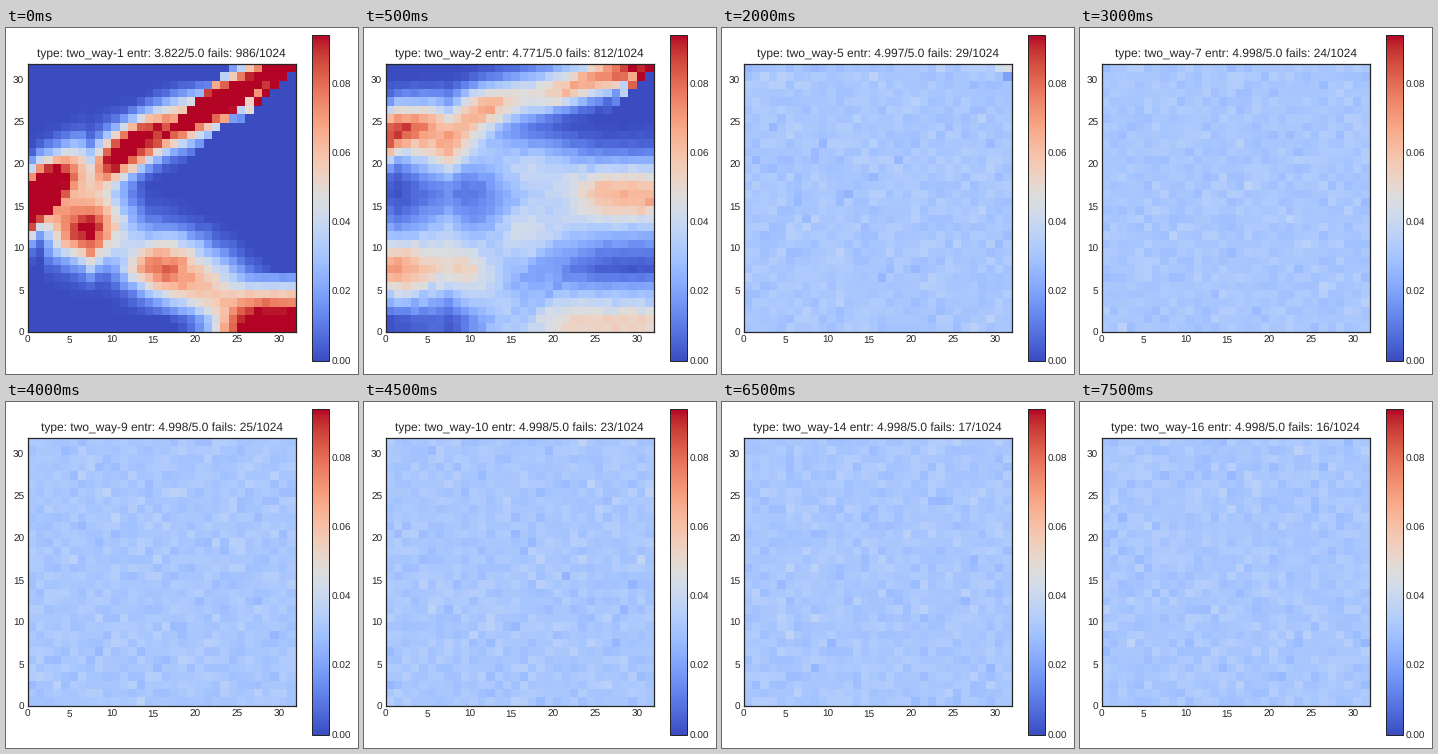
Write a matplotlib script that moves like this. It is 352 px wide and 346 px high and loops after 8000 ms.

```python
import numpy as np
import matplotlib.pyplot as plt
from matplotlib.animation import FuncAnimation

W, H, DPI = 352, 346, 72
N, TRIALS, VMAX = 32, 10000, 0.0942
INK = "0.15"

plt.rcParams.update({
    "font.family": "Liberation Sans", "font.size": 10,
    "text.color": INK, "axes.edgecolor": INK, "text.hinting": "no_hinting",
    "xtick.labelcolor": INK, "ytick.labelcolor": INK,
})

# Title statistics after each shuffle
FAILS = [986, 812, 356, 97, 29, 25, 24, 22, 25, 23, 20, 18, 21, 17, 19, 16]
ENTROPY = [3.822, 4.771, 4.959, 4.991, 4.997]


def two_way(decks, rng):
    """Overhand shuffle: packets of 2 to 7 cards go alternately to each end."""
    cards = np.arange(N)
    ends = rng.integers(2, 8, (len(decks), N // 2)).cumsum(axis=1)
    packet = (ends[:, None, :] <= cards[:, None]).sum(axis=2)
    key = np.where(packet % 2, cards - 2 * N * packet, cards)
    return np.take_along_axis(decks, key.argsort(axis=1), axis=1)


def frequencies(decks):
    """Share of trials with card x at place y, as an array [y, x]."""
    cells = np.arange(N) * N + decks
    return np.bincount(cells.ravel(), minlength=N * N).reshape(N, N) / TRIALS


def simulate():
    rng = np.random.default_rng(7)
    decks = np.tile(np.arange(N), (TRIALS, 1))
    for _ in FAILS:
        decks = two_way(decks, rng)
        yield frequencies(decks)


def box(left, top, right, bottom):
    return [left / W, 1 - bottom / H, (right - left) / W, (bottom - top) / H]


fields = list(simulate())
edges = np.arange(N + 1)

fig = plt.figure(figsize=(W / DPI, H / DPI), dpi=DPI, facecolor="white")
ax = fig.add_axes(box(21.7, 36, 289.6, 303.84))
mesh = ax.pcolormesh(edges, edges, fields[0], cmap="coolwarm",
                     vmin=0, vmax=VMAX)
ax.set(xlim=(0, N), ylim=(0, N), xticks=range(0, N, 5), yticks=range(0, N, 5))
ax.tick_params(axis="x", length=0, pad=4)
ax.tick_params(axis="y", length=0, pad=3.5)
for spine in ax.spines.values():
    spine.set_linewidth(1.25)
title = ax.set_title("", fontsize=12, pad=6)

cax = fig.add_axes(box(306.3, 6.8, 322.6, 333))
bar = fig.colorbar(mesh, cax=cax, ticks=np.arange(5) * 0.02, format="%.2f")
bar.outline.set_linewidth(1)
cax.tick_params(length=0, pad=3.5)


def draw(k):
    entropy = ENTROPY[k] if k < len(ENTROPY) else 4.998
    mesh.set_array(fields[k])
    title.set_text(f"type: two_way-{k + 1} entr: {entropy:.3f}/5.0 "
                   f"fails: {FAILS[k]}/1024")
    return mesh, title


anim = FuncAnimation(fig, draw, frames=len(fields), interval=500,
                     repeat=True, repeat_delay=0, blit=False)
plt.show()
```
